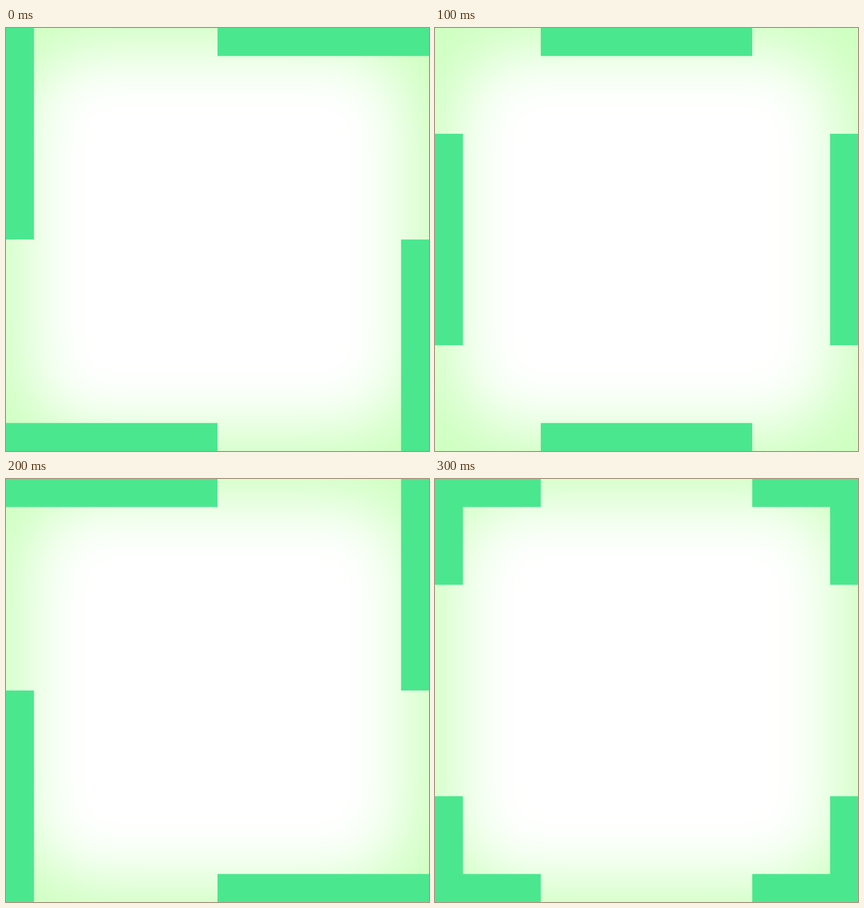
Animation, 748 px wide and 748 px high, one loop 400 ms. Source, as an HTML page:

```html
<!DOCTYPE html>
<html lang="en">
<head>
<meta charset="utf-8">
<title>Marching border</title>
<style>
  html, body { margin: 0; width: 100%; height: 100%; overflow: hidden; background: #ceffc0; }
  svg { display: block; width: 100%; height: 100%; }
</style>
</head>
<body>
<svg viewBox="0 0 748 748">
  <filter id="soft" filterUnits="userSpaceOnUse" x="-200" y="-200" width="1148" height="1148" color-interpolation-filters="sRGB">
    <feGaussianBlur stdDeviation="56"/>
  </filter>
  <rect width="748" height="748" fill="#ceffc0"/>
  <rect x="40" y="40" width="668" height="668" rx="110" fill="#fff" filter="url(#soft)"/>
  <!-- One subpath per side, counterclockwise, so dashes restart on each side -->
  <path id="border" fill="none" stroke="#4be78f" stroke-width="49.4" stroke-dasharray="374"
        d="M748 24.7H0 M24.7 0V748 M0 723.3H748 M723.3 748V0"/>
</svg>
<script>
  const STEP_MS = 100, STEPS = 4, STEP_LENGTH = 748 / STEPS;
  const border = document.getElementById('border');
  const start = performance.now();

  function draw(now) {
    const step = Math.floor(Math.max(0, now - start) / STEP_MS) % STEPS;
    border.setAttribute('stroke-dashoffset', -step * STEP_LENGTH);
    requestAnimationFrame(draw);
  }
  draw(start);
</script>
</body>
</html>
```
